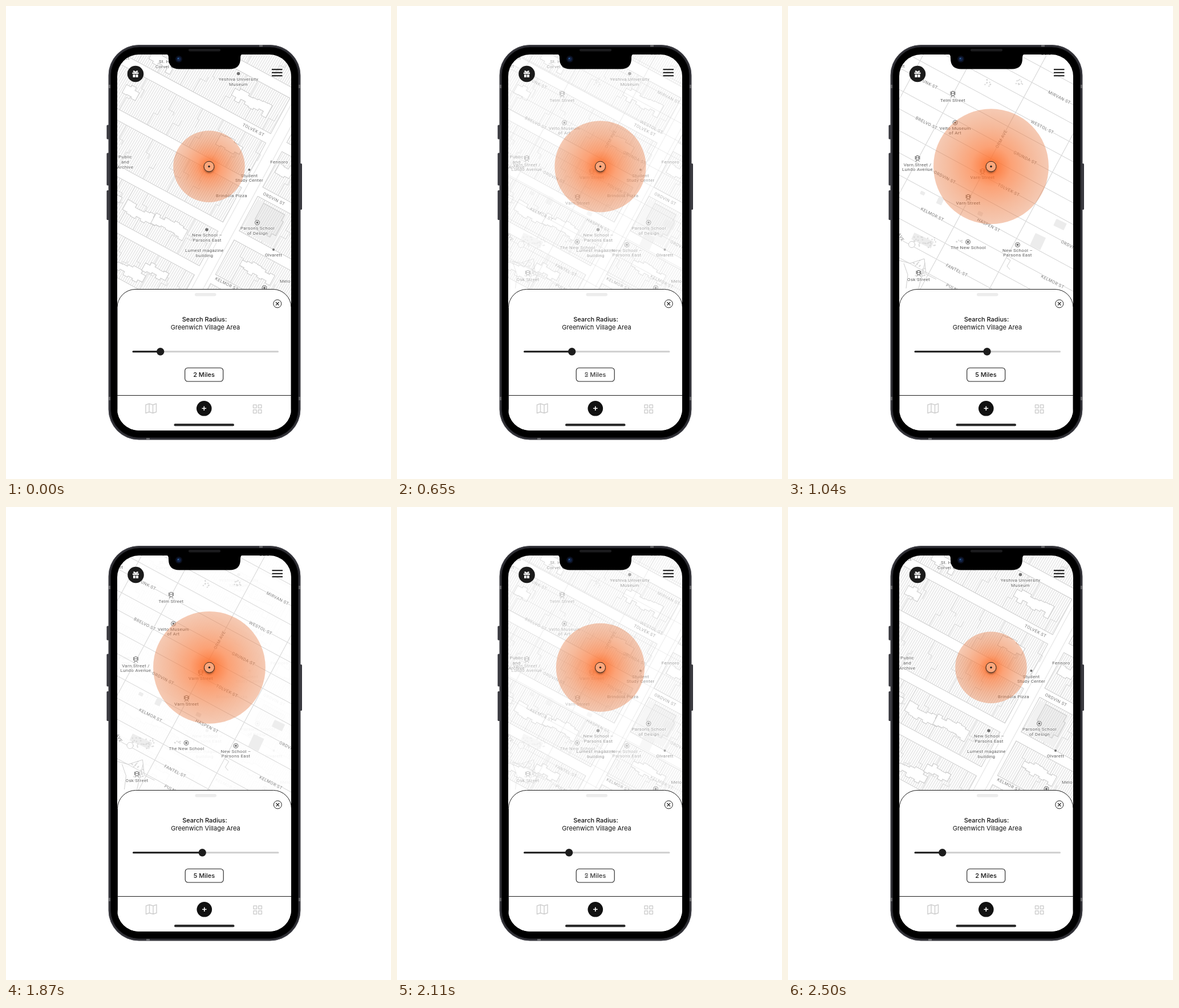
These frames come from a looping animation (675 by 829 pixels, 3.33 s). An HTML page:

```html
<!DOCTYPE html>
<html lang="en">
<head>
<meta charset="utf-8">
<title>Search radius</title>
<style>
html, body { margin: 0; width: 100%; height: 100%; overflow: hidden; background: #fff; }
svg { display: block; width: 675px; height: 829px; }
.map text { font: 8px Roboto, Arial, sans-serif; letter-spacing: .3px; fill: #5c5c5c; paint-order: stroke; stroke: #fff; stroke-width: 1.6px; stroke-linejoin: round; }
.map .road { font-size: 7.5px; letter-spacing: .5px; fill: #777; }
.ui text { font: 11px Inter, Arial, sans-serif; fill: #111; text-anchor: middle; }
.ui .strong { font-weight: 500; }
</style>
</head>
<body>
<svg id="stage" viewBox="0 0 675 829"></svg>
<script>
const LOOP = 3330;
const STEPS = [0, 580, 650, 730, 810, 890, 960, 1040, 1870, 1940, 2030, 2110, 2180, 2260, 2340, 2420, 2500];
const SLOPE = 0.54;

let seed = 11;
const random = () => (seed = (seed * 16807) % 2147483647) / 2147483647;
const between = (a, b) => a + (b - a) * random();

const rect = (x, y, w, h, rx, attrs) =>
  `<rect x="${x}" y="${y}" width="${w}" height="${h}" rx="${rx}" ${attrs}/>`;
const circle = (x, y, r, attrs) => `<circle cx="${x}" cy="${y}" r="${r}" ${attrs}/>`;
const path = (d, attrs) => `<path d="${d}" ${attrs}/>`;
const label = (x, y, lines, anchor = 'middle') => lines.split('|').map((line, i) =>
  `<text x="${x}" y="${y + i * 8.8}" text-anchor="${anchor}">${line}</text>`).join('');
const road = (x, y, name, angle = 27) =>
  `<text class="road" text-anchor="middle" transform="translate(${x} ${y}) rotate(${angle})" y="2.7">${name}</text>`;
const dot = (x, y, r = 2) => circle(x, y, r, 'fill="#707070"');
const pin = (x, y) => circle(x, y, 4, 'fill="#fff" stroke="#666"') + dot(x, y);
const station = (x, y) => rect(x - 2.5, y - 4.5, 5, 7.5, 1.5, 'fill="#fff" stroke="#555"') +
  path(`M${x - 2} ${y - 1}h4M${x - 1.5} ${y + 3}l-2 3M${x + 1.5} ${y + 3}l2 3M${x - 4} ${y - 4}v6M${x + 4} ${y - 4}v6`,
    'stroke="#666" stroke-width=".9"');

// An irregular yard along the street direction.
function yard(u, v, length) {
  const count = Math.round(length / 9);
  const edge = side => Array.from({ length: count }, (_, i) => {
    const w = v + side * between(4, 13);
    const a = u - length / 2 + i * 9;
    return [[a, w], [a + 9, w]];
  }).flat();
  return path('M' + [...edge(-1), ...edge(1).reverse()].join('L') + 'Z',
    'fill="#fff" stroke="#c4c4c4" stroke-width=".9"');
}

function block(u0, u1, v0, v1) {
  const mid = (v0 + v1) / 2;
  let lots = '';
  for (const [from, sign] of [[v0, 1], [v1, -1]]) {
    for (let u = u0 + between(12, 40); u < u1 - 8; u += between(22, 60)) {
      const depth = sign * between(20, 34), step = between(4, 12);
      lots += `M${u} ${from}v${depth}h${step}V${mid}`;
    }
  }
  return rect(u0, v0, u1 - u0, v1 - v0, 0, 'fill="url(#hatch)" stroke="#cacaca" stroke-width=".9"') +
    path(lots, 'fill="none" stroke="#d2d2d2" stroke-width=".8"');
}

function closeMap() {
  const streets = [-356, -267, -178, -89, 0, 87, 174, 261];
  let city = '';
  for (let i = 1; i < streets.length; i++) {
    const v0 = streets[i - 1] + 9, v1 = streets[i] - 9;
    city += block(-340, -16, v0, v1) + block(16, 240, v0, v1);
  }
  const yards = [[-73, -131, 72], [-266, -47, 27], [-244, -118, 45], [-70, -46, 45], [36, -52, 27],
    [-150, 134, 63], [-95, 128, 63], [-122, 232, 63], [-79, 210, 45], [77, 125, 63], [-210, 130, 36]];
  city += yards.map(y => yard(...y)).join('');
  city += rect(20, 14, 58, 60, 0, 'fill="#f1f1f1"') +
    path('M31 15h42v12h4v28h-8v7h-31v-15h-7Z', 'fill="url(#hatch)" stroke="#cacaca"') +
    path('M-9-400V400M9-400V400', 'stroke="#e8e8e8" stroke-width="1.4"');
  return `<g transform="translate(431.6 317.8) rotate(28.4)">${city}</g>` +
    label(213, 94, 'et') + label(268, 100, 'St. H', 'start') + label(262, 108.5, 'Corvel C', 'start') +
    dot(407.5, 118.5, 2.8) + label(407.5, 131, 'Yeshiva University|Museum') +
    label(209, 267, 'Public|and|Archive') + label(479, 276, 'Fennoro') +
    dot(426.5, 287) + label(426.5, 299.5, 'Student|Study Center') + label(395.5, 335, 'Brindola Pizza') +
    pin(440.5, 379.5) + label(441, 392, 'Parsons School|of Design') +
    dot(352, 392, 2.8) + label(352.5, 404, 'New School –|Parsons East') +
    label(348, 431, 'Lumest magazine|building') + dot(469, 427) + label(469, 439, 'Olvarett') +
    label(480, 485, 'Melo', 'start') + pin(453, 494) +
    road(434, 217, 'TOLVEK ST') + road(470, 338, 'ORDVIN ST') + road(387, 487, 'KELMOR ST');
}

function wideMap() {
  const rows = [-170, -133, -97, -63, -29, 3, 41, 75, 113, 152, 191, 230, 267, 303, 336];
  const lines = rows.map(c => `M190 ${c + 190 * SLOPE}L505 ${c + 505 * SLOPE}`).join('');
  // Avenues, each given by one point it passes through.
  const avenues = [[289, 155], [374, 233], [420, 372], [232, 95]].map(([x, y]) =>
    `M${x + SLOPE * (y - 80)} 80L${x - SLOPE * (500 - y)} 500`).join('');
  const plots = [[438, 413, 20, 24], [477, 383, 20, 13], [267, 341, 10, 14], [236, 328, 8, 6],
    [337, 364, 9, 7], [236, 411, 38, 13]].map(([x, y, w, h]) =>
    `<g transform="translate(${x} ${y}) rotate(25)">${rect(-w / 2, -h / 2, w, h, 1, 'fill="#ececec"')}</g>`).join('');
  const trees = [[351, 135, 12, 12], [406, 135, 14, 13], [301, 412, 12, 6], [238, 414, 50, 20], [229, 462, 22, 36]]
    .map(([x, y, w, h]) => Array.from({ length: Math.round(5 + w * h / 35) }, () =>
      circle(x + between(-w, w) / 2, y + between(-h, h) / 2, .9, 'fill="#e2e2e2" stroke="#c8c8c8" stroke-width=".5"')).join('')).join('');
  return path(lines, 'stroke="#d0d0d0" stroke-width="1"') + path(avenues, 'stroke="#d9d9d9" stroke-width="1.2"') +
    plots + trees + circle(217, 418, 5.5, 'fill="#fff" stroke="#ccc"') +
    path('M195 446l19 5 25-8 3 27 18 9M203 451l7 20-3 24M240 450l-11 45M383 441l7 5-6 10 5 6', 'fill="none" stroke="#ccc"') +
    label(201, 108, 'et') + label(444, 86, 'Dalo Verr', 'start') +
    station(289, 154) + label(289, 168, 'Telm Street') +
    pin(293, 204.5) + label(293, 216.5, 'Velto Museum|of Art') +
    station(227, 267) + label(227, 280.5, 'Varn Street /|Lundo Avenue') +
    station(341, 290) + label(341, 303, 'Varn Street') +
    station(316, 335) + label(316, 348, 'Varn Street') +
    pin(315.5, 413.5) + label(316, 426, 'The New School') +
    pin(402.5, 418.5) + label(402.5, 430.5, 'New School –|Parsons East') +
    station(229, 468) + label(229, 482, 'Osk Street') +
    [[476, 160, 'MIRVAN ST'], [446, 212, 'WESTOL ST'], [416, 266, 'GRUNDA ST'], [387, 322, 'TOLVEK ST'],
      [352, 384, 'HASPEN ST'], [247, 136, 'VUNK ST'], [243, 205, 'BRELVO ST'], [275, 300, 'ORDVIN ST'],
      [253, 365, 'KELMOR ST'], [296, 463, 'FANTEL ST'], [297, 498, 'PULNEY ST'], [498, 422, 'ORDVIN ST'],
      [464, 483, 'KELMOR ST']].map(r => road(...r)).join('') +
    road(374, 233, 'ORM AVE', -62) + road(198, 405, 'AVE', 62);
}

const ink = 'fill="none" stroke="#1d1d1d"';
const pale = 'fill="none" stroke="#cfcfcf" stroke-width="1.5" stroke-linejoin="round"';
const metal = 'fill="#36363c"';

const body =
  rect(176.5, 208.5, 6, 25, 1.5, metal) + rect(176.5, 257.5, 6, 57, 1.5, metal) +
  rect(176.5, 323, 6, 52, 1.5, metal) + rect(513, 276, 6, 81, 1.5, metal) +
  rect(180, 68.5, 336, 691.5, 53, 'fill="#303036" stroke="#48484e"') +
  path('M180 141h4M512 141h4M180 688h4M512 688h4M447 68v4M249 756v4', 'stroke="#68686c" stroke-width="6"') +
  rect(183.5, 72, 329, 684.5, 50, 'fill="#000" stroke="#17171a"');

const notch = path('M279 84Q285 84 285 90V92Q285 110.500 303.500 110.500H392.500Q411 110.500 411 92V90Q411 84 417 84Z', 'fill="#000"') +
  rect(320, 75, 56, 4.5, 2, 'fill="#1b1b1d"') +
  circle(303, 93, 6, 'fill="#0b1020"') + circle(303, 93, 3.5, 'fill="#14264a"') + circle(302, 92, 1.2, 'fill="#32649c"');

const controls =
  circle(227, 119, 14.3, 'fill="#1b1b1b"') +
  path('M221.500 116.500h11v2.500h-11ZM222.500 120h4v5h-4ZM227.500 120h4v5h-4Z', 'fill="#fff"') +
  path('M227 116C221 116 223 111 227 116C231 111 233 116 227 116', 'fill="none" stroke="#fff" stroke-width="1.2"') +
  path('M466 111.200h18.500M466 116.700h18.500M466 122.200h18.500', 'stroke="#111" stroke-width="1.9"');

const sheet =
  path('M195 750V528.500A32 32 0 0 1 227 496.500H468A32 32 0 0 1 500 528.500V750Z', 'fill="#fff" stroke="#1d1d1d"') +
  rect(331, 503, 37.5, 5.5, 2.7, 'fill="#ececec"') +
  circle(475.8, 521.8, 7, ink) + path('M473 519l5.600 5.600M478.600 519l-5.600 5.600', ink + ' stroke-width="1.2"') +
  '<text class="strong" x="348" y="553.2">Search Radius:</text><text x="349.5" y="566.7">Greenwich Village Area</text>' +
  path('M223 605.700H476.500', 'stroke="#cfcfcf" stroke-width="3" stroke-linecap="round"') +
  '<path id="track" stroke="#1d1d1d" stroke-width="3" stroke-linecap="round"/>' +
  '<circle id="knob" cy="605.7" r="6.7" fill="#1d1d1d"/>' +
  rect(313.7, 634.2, 67, 23.8, 5, ink + ' stroke-width="1.1"') +
  '<text class="strong" id="near" x="347" y="650">2 Miles</text><text class="strong" id="far" x="347" y="650">5 Miles</text>' +
  path('M195 682.500H500', ink) +
  path('M245 699l6-2 6.500 2 6-2v14.500l-6 2-6.500-2-6 2ZM251 697v14.500M257.500 699v14.500', pale) +
  [[433.5, 699], [442.3, 699], [433.5, 707.8], [442.3, 707.8]].map(([x, y]) => rect(x, y, 5.6, 5.6, .5, pale)).join('') +
  circle(347.3, 705.3, 13.3, 'fill="#111"') + path('M343.500 705.300h7.600M347.300 701.500v7.600', 'stroke="#fff" stroke-width="1.6"') +
  rect(294.5, 732, 105.5, 4.3, 2.1, 'fill="#2b2b2b"');

document.getElementById('stage').innerHTML = `
  <defs>
    <pattern id="hatch" width="3.8" height="8" patternUnits="userSpaceOnUse" patternTransform="rotate(2)">
      <path d="M1 0V8" stroke="#c8c8c8" stroke-width=".75"/>
    </pattern>
    <radialGradient id="glow">
      <stop offset="0" stop-color="#ff6a24" stop-opacity=".95"/>
      <stop offset=".35" stop-color="#fb7a3b" stop-opacity=".7"/>
      <stop offset=".7" stop-color="#ee7a3f" stop-opacity=".52"/>
      <stop offset="1" stop-color="#e67a43" stop-opacity=".4"/>
    </radialGradient>
    <filter id="soft" x="-50%" y="-50%" width="200%" height="200%"><feGaussianBlur stdDeviation="1.6"/></filter>
    <clipPath id="screen">${rect(195, 85, 305, 659, 38, '')}</clipPath>
  </defs>
  ${body}
  <g clip-path="url(#screen)">
    ${rect(195, 85, 305, 659, 0, 'fill="#fff"')}
    <g id="content">
      <g class="map" id="close">${closeMap()}</g>
      <g class="map" id="wide">${wideMap()}</g>
      <circle id="area" cx="356" cy="281.3" fill="url(#glow)"/>
      ${circle(356, 284, 9, 'fill="#000" opacity=".35" filter="url(#soft)"')}
      ${circle(356, 281.3, 9, 'fill="#fca77c" stroke="#2a2019"')}${circle(356, 281.3, 1.7, 'fill="#222"')}
      <g class="ui">${controls}${sheet}</g>
    </g>
  </g>
  ${notch}`;

const set = (id, name, value) => document.getElementById(id).setAttribute(name, value);

// The curve cubic-bezier(0, 0, .58, 1), solved by bisection.
function easeOut(x) {
  if (x <= 0) return 0;
  if (x >= 1) return 1;
  let low = 0, high = 1;
  for (let i = 0; i < 24; i++) {
    const s = (low + high) / 2;
    if (1.74 * (1 - s) * s * s + s ** 3 < x) low = s; else high = s;
  }
  return low * low * (3 - 2 * low);
}

function render(time) {
  const held = STEPS.filter(step => step <= time).pop();
  const p = easeOut((held - 494) / 510) - easeOut((held - 1845) / 610);
  const knob = 270.7 + 78.3 * p;
  set('close', 'opacity', 1 - p);
  set('wide', 'opacity', p);
  set('near', 'opacity', 1 - p);
  set('far', 'opacity', p);
  set('area', 'r', 62.8 + 38.2 * p);
  set('knob', 'cx', knob);
  set('track', 'd', `M223 605.7H${knob}`);
  set('content', 'transform', `translate(${p > .01 && p < .99 ? .5 : 0} 0)`);
}

const start = performance.now();
function tick() {
  render((performance.now() - start) % LOOP);
  requestAnimationFrame(tick);
}
tick();
</script>
</body>
</html>
```
